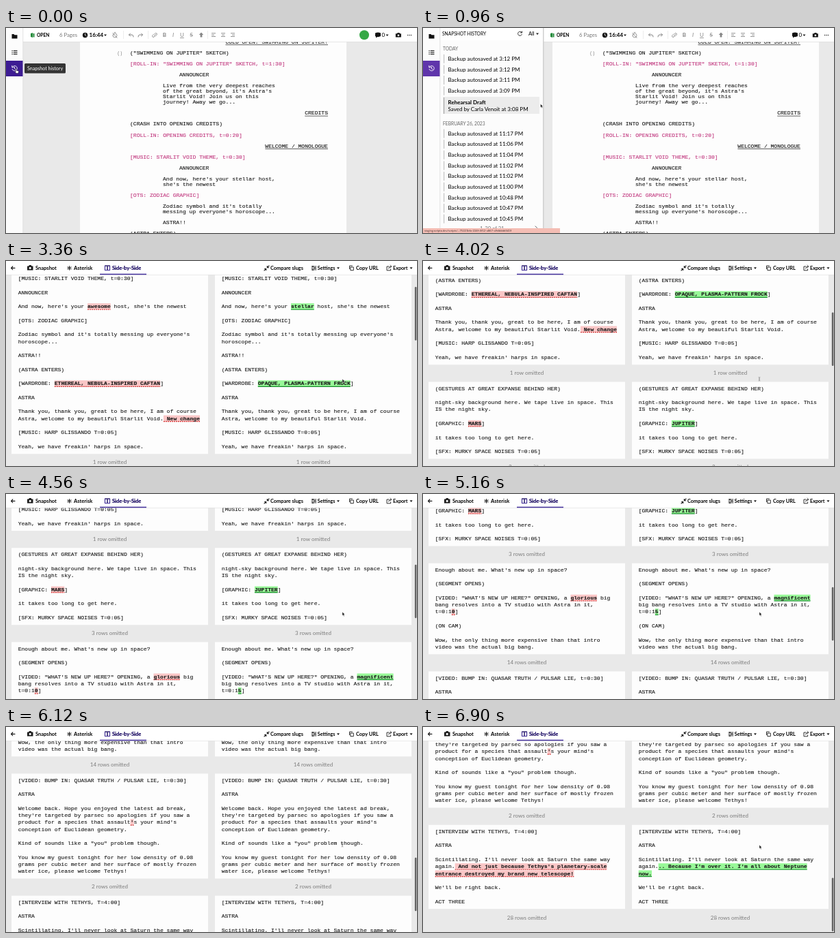
An HTML page for the animation above (6.96 s loop, 600 by 301 pixels).

```html
<!DOCTYPE html>
<html lang="en">
<head>
<meta charset="utf-8">
<title>Snapshot history and side-by-side compare</title>
<style>
html, body { margin: 0; width: 100%; height: 100%; overflow: hidden; background: #e9e9e9; }
svg { display: block; width: 100vw; height: 100vh; }
text { font-family: Lato, "Open Sans", sans-serif; white-space: pre; }
.mono { font-family: "Liberation Mono", "DejaVu Sans Mono", monospace; stroke-width: .14px; }
.line { fill: none; stroke-linecap: round; stroke-linejoin: round; }
</style>
</head>
<body>
<svg id="stage" viewBox="0 0 600 301" preserveAspectRatio="none"></svg>
<script>
const LOOP = 6960, STEP = 60;
const OPEN_COMPARE = 1500, SIDE_BY_SIDE = 2100;
const MONO = 8.04, PITCH = MONO * 0.6;
const INK = '#1c1c1c', GREY = '#8a8a8a', PURPLE = '#43309c', PINK = '#c23b80';

// Markup helpers; text is placed by the middle of its line.
const esc = s => s.replace(/&/g, '&amp;').replace(/</g, '&lt;');
const text = (x, y, s, size = 7.5, attrs = '') =>
  `<text x="${x}" y="${y + size * 0.34}" font-size="${size}" ${attrs}>${esc(s)}</text>`;
const bold = (x, y, s, size = 7.5, attrs = '') => text(x, y, s, size, `font-weight="700" ${attrs}`);
const mono = (x, y, s, color = INK, attrs = '') =>
  text(x, y - 0.7, s, MONO, `class="mono" fill="${color}" stroke="${color}" ${attrs}`);
const rect = (x, y, w, h, fill, attrs = '') =>
  `<rect x="${x}" y="${y}" width="${w}" height="${h}" fill="${fill}" ${attrs}/>`;
const circle = (x, y, r, fill) => `<circle cx="${x}" cy="${y}" r="${r}" fill="${fill}"/>`;
const fill = (d, color = INK) => `<path d="${d}" fill="${color}"/>`;
const line = (d, color = INK, w = 1) => `<path class="line" d="${d}" stroke="${color}" stroke-width="${w}"/>`;
const caret = (x, y) => fill(`M${x - 2} ${y - 1}h4l-2 2.6z`);
const group = (id, body) => `<g id="${id}">${body}</g>`;

// Script page
const script = [
  [2, 'action', '("SWIMMING ON JUPITER" SKETCH)'],
  [4, 'cue', '[ROLL-IN: "SWIMMING ON JUPITER" SKETCH, t=1:30]'],
  [6, 'speaker', 'ANNOUNCER'],
  [8, 'speech', 'Live from the very deepest reaches'],
  [9, 'speech', "of the great beyond, it's Astra's"],
  [10, 'speech', 'Starlit Void! Join us on this'],
  [11, 'speech', 'journey! Away we go...'],
  [13, 'slug', 'CREDITS'],
  [15, 'action', '(CRASH INTO OPENING CREDITS)'],
  [17, 'cue', '[ROLL-IN: OPENING CREDITS, t=0:20]'],
  [19, 'slug', 'WELCOME / MONOLOGUE'],
  [21, 'cue', '[MUSIC: STARLIT VOID THEME, t=0:30]'],
  [23, 'speaker', 'ANNOUNCER'],
  [25, 'speech', "And now, here's your stellar host,"],
  [26, 'speech', "she's the newest"],
  [28, 'cue', '[OTS: ZODIAC GRAPHIC]'],
  [30, 'speech', "Zodiac symbol and it's totally"],
  [31, 'speech', "messing up everyone's horoscope..."],
  [33, 'speech', 'ASTRA!!'],
  [35, 'action', '(ASTRA ENTERS)'],
  [0, 'slug', 'COLD OPEN: SWIMMING ON JUPITER!']
];
const indent = { action: 181, cue: 181, speaker: 253, speech: 229 };

function scriptPage() {
  let out = rect(108, 0, 389, 301, '#fdfdfd') + text(163, 37, '( )', 8, `fill="${GREY}"`);
  for (const [row, kind, s] of script) {
    const y = 21 + row * 8.03, slug = kind === 'slug';
    const x = slug ? 470 - s.length * PITCH : indent[kind];
    out += mono(x, y, s, kind === 'cue' ? PINK : INK);
    if (slug) out += rect(x, y + 3.4, 470 - x, 0.7, INK);
  }
  return out;
}

function formatBar() {
  const g = '#858585';
  const rule = x => rect(x, 4, 0.6, 12, '#e2e2e2');
  const align = (x, inset) => [0, 1, 2].map(i => {
    const cut = i === 1 ? 2 : 0;
    return rect(x - 3 + cut * inset, 7.3 + i * 2.4, 6 - cut, 0.9, g);
  }).join('');
  return fill('M36 8l3-1v7l-3-1zM39.5 8h2v5.5h-2z', '#268c3c') + bold(45, 10.5, 'OPEN', 6.6) +
    text(78, 10.5, '6 Pages', 7.7, 'fill="#777"') +
    circle(115.5, 10.5, 3.7, '#111') + line('M115.5 8.2v2.5l1.6 1', '#fff', 0.8) +
    bold(121.5, 10.5, '16:44', 8) + caret(145, 10.5) +
    line('M156 11a3 3 0 1 0 6 0a3 3 0 1 0-6 0M158 6.5h2M156 7.5l6 7', g, 0.8) +
    rule(171) +
    line('M179.5 10h4.5q2 0 2 3M181.5 8l-2 2l2 2', g) +
    line('M199.5 10h-4.5q-2 0-2 3M197.5 8l2 2l-2 2', g) + rule(207) +
    line('M216 12l3-3M216 9.5l1.6-1.6a1.7 1.7 0 0 1 2.4 2.4l-1.2 1.2M218 11.5l-1.6 1.6a1.7 1.7 0 0 1-2.4-2.4l1.2-1.2', g, 0.8) +
    bold(228.7, 10.5, 'B', 8, `fill="${g}"`) + text(243, 10.5, 'I', 8, `fill="${g}" font-style="italic"`) +
    text(254, 10.3, 'U', 8, `fill="${g}" text-decoration="underline"`) +
    text(268.5, 10.5, 'S', 8, `fill="${g}" text-decoration="line-through"`) +
    fill('M285 6.5l3.2 3.5h-1.8v3.5h-2.8v-3.5h-1.8z', g) + rule(294) +
    align(303, 0) + align(317, 0.5) + align(331, 1);
}

const fixedTools = () =>
  fill('M539 7.5q4-2 8 0v4.5q-3 1.5-5 1l-2 1.5v-2.2h-1z', '#111') + text(548.5, 10.5, '0', 8) + caret(556.5, 10.5) +
  fill('M568.8 8.3h2l1-1.3h2.4l1 1.3h1.6v5.2h-8z', '#111') + circle(572.9, 10.8, 1.4, '#fff') +
  [586.5, 589, 591.5].map(x => circle(x, 10.5, 0.8, '#333')).join('');

const sidebar = () => rect(0, 0, 25, 301, '#fcfcfc') + rect(24.5, 0, 0.7, 301, '#d5d5d5') +
  fill('M8.5 9h3l1 1.2h4v5.3h-8z', '#111') +
  [32.8, 35.3, 37.8].map(y => rect(8.5, y, 1.2, 1.2, '#111') + rect(10.8, y, 5.7, 1.1, '#111')).join('') +
  rect(0, 48, 24.5, 23, '#5f35ab', 'id="historyTab"') +
  line('M9.3 57.5a3.7 3.7 0 1 1-.2 3M8.8 55.3v2.5h2.5M12.5 57.5v2.2l1.7 1', '#fff', 0.9);

// Snapshot list
const ROW = 15.65;
const today = ['3:12', '3:12', '3:11', '3:09'];
const earlier = ['11:17', '11:06', '11:04', '11:02', '11:02', '11:00', '10:48', '10:47', '10:45'];
const backup = (time, y) => rect(30, y - 6.5, 1.2, 13, '#c4c4c4') + text(36.5, y, `Backup autosaved at ${time} PM`, 8);

const historyPanel = () => rect(25, 0, 151, 301, '#fcfcfc') + rect(25, 0, 151, 18, '#fff') +
  text(28, 8.5, 'SNAPSHOT HISTORY', 6.65) +
  line('M144 6.5a3 3 0 1 0 .3 3M144.5 5v2h-2', INK, 0.9) + text(154, 8.5, 'All', 7.5) + caret(167, 8.5) +
  rect(29, 0, 141, 15, '#ececec', 'id="hover"') +
  text(29, 30.5, 'TODAY', 6.7, 'fill="#666"') + today.map((t, i) => backup(t, 45.2 + i * ROW)).join('') +
  rect(30, 102, 1.2, 24, '#aaa') + bold(36.5, 109, 'Rehearsal Draft', 8) +
  text(36.5, 119.5, 'Saved by Carla Venoit at 3:08 PM', 8) +
  text(29, 140.3, 'FEBRUARY 26, 2023', 6.7, 'fill="#666"') +
  earlier.map((t, i) => backup(t, 155 + i * ROW)).join('') +
  text(83, 294, '1-20 of 21', 7.6, 'fill="#777"') + line('M164 291l2.5 2.5l-2.5 2.5', '#666') +
  rect(175, 0, 1.5, 301, '#cfcfcf');

// Compare cards: {removed|added} marks a difference, {~a|~b} differs without a highlight,
// empty strings are blank rows.
const cards = [
  ['10 rows', ['[MUSIC: STARLIT VOID THEME, t=0:30]', '', 'ANNOUNCER', '',
    "And now, here's your {awesome|stellar} host, she's the newest", '', '[OTS: ZODIAC GRAPHIC]', '',
    "Zodiac symbol and it's totally messing up everyone's", 'horoscope...', '', 'ASTRA!!', '', '(ASTRA ENTERS)', '',
    '[WARDROBE: {ETHEREAL, NEBULA-INSPIRED CAFTAN|OPAQUE, PLASMA-PATTERN FROCK}]', '', 'ASTRA', '',
    'Thank you, thank you, great to be here, I am of course',
    'Astra, welcome to my beautiful Starlit Void.{ New change|}', '',
    '[MUSIC: HARP GLISSANDO T=0:05]', '', "Yeah, we have freakin' harps in space."]],
  ['1 row', ['(GESTURES AT GREAT EXPANSE BEHIND HER)', '',
    'night-sky background here. We tape live in space. This', 'IS the night sky.', '',
    '[GRAPHIC: {MARS|JUPITER}]', '', 'it takes too long to get here.', '', '[SFX: MURKY SPACE NOISES T=0:05]']],
  ['3 rows', ["Enough about me. What's new up in space?", '', '(SEGMENT OPENS)', '',
    '[VIDEO: "WHAT\'S NEW UP HERE?" OPENING, a {glorious|magnificent} {~big|}',
    '{~bang|~big bang} resolves into a TV studio with Astra in it,', 't=0:1{0|5}]', '', '(ON CAM)', '',
    'Wow, the only thing more expensive than that intro', 'video was the actual big bang.']],
  ['14 rows', ['[VIDEO: BUMP IN: QUASAR TRUTH / PULSAR LIE, t=0:30]', '', 'ASTRA', '',
    'Welcome back. Hope you enjoyed the latest ad break,', "they're targeted by parsec so apologies if you saw a",
    "product for a species that assault{'|}s your mind's", 'conception of Euclidean geometry.', '',
    'Kind of sounds like a "you" problem though.', '',
    'You know my guest tonight for her low density of 0.98', 'grams per cubic meter and her surface of mostly frozen',
    'water ice, please welcome Tethys!']],
  ['2 rows', ['[INTERVIEW WITH TETHYS, T=4:00]', '', 'ASTRA', '',
    "Scintillating. I'll never look at Saturn the same way",
    "again.{ And not just because Tethys's planetary-scale|.. Because I'm over it. I'm all about Neptune}",
    '{entrance destroyed my brand new telescope!|now.}', '', "We'll be right back.", '', 'ACT THREE']]
];
const SIDES = [{ x: 8, bg: '#fac6c6', mark: '#d02c2c', dash: '2 1' }, { x: 305, bg: '#98f898', mark: '#128a26', dash: '' }];

function diffLine(x, y, s, side) {
  const { bg, mark, dash } = SIDES[side];
  let out = '', column = 0;
  for (const part of s.split(/(\{.*?\})/)) {
    const choice = part[0] === '{' ? part.slice(1, -1).split('|')[side] : '~' + part;
    const marked = choice[0] !== '~', words = marked ? choice : choice.slice(1);
    if (!words) continue;
    const left = x + column * PITCH, w = words.length * PITCH;
    if (marked) out += rect(left, y - 5.1, w, 9, bg) +
      `<path d="M${left} ${y + 4}h${w}" stroke="${mark}" stroke-width="1.2" stroke-dasharray="${dash}"/>`;
    out += mono(left, y, words, INK, marked ? 'font-weight="700"' : '');
    column += words.length;
  }
  return out;
}

function comparePage() {
  const omitted = (label, y) => SIDES.map(({ x }) =>
    text(x + 143.5, y, label + ' omitted', 8, 'fill="#7c7c7c" text-anchor="middle"')).join('');
  let out = SIDES.map(({ x }) => rect(x, 28, 287, 20, '#fafafa')).join('') +
    bold(12, 38, 'REHEARSAL DRAFT - FEB 27, 2023 - 3:08 PM', 7.5) + bold(309, 38, 'CURRENT DOCUMENT', 7.5) +
    text(391, 38, 'as of 3:15 pm', 7.4, 'fill="#777"');
  let top = 73;
  for (const [label, rows] of cards) {
    const height = (rows.length - 1) * 10.28 + 20.5;
    out += omitted(label, top - 13);
    SIDES.forEach(({ x }, side) => {
      out += rect(x, top, 287, height, '#fdfdfd');
      rows.forEach((s, i) => { if (s) out += diffLine(x + 9.7, top + 10.1 + i * 10.28, s, side); });
    });
    top += height + 25.2;
  }
  return out + omitted('28 rows', top - 12.2);
}

const tabs = [
  { id: 'snapshotTab', x: 43, label: 'Snapshot', from: 26, to: 79,
    icon: c => fill('M31 7.5h2l1-1.5h2.5l1 1.5h2v6h-8.5z', c) + circle(35.2, 10.3, 1.6, '#fff') },
  { id: 'asteriskTab', x: 99, label: 'Asterisk', icon: c => line('M92.5 7.5v5.6M90 8.9l5 2.8M95 8.9l-5 2.8', c, 1.1) },
  { id: 'sideTab', x: 155, label: 'Side-by-Side', from: 137, to: 205,
    icon: c => line('M144.5 7h7v6.5h-7zM148 7v6.5', c, 1.1) }
];
const compareBar = () => rect(0, 0, 600, 20, '#fff') + rect(0, 20, 600, 0.6, '#e0e0e0') +
  line('M7.5 10.3h5.5M9.8 8l-2.3 2.3l2.3 2.3', INK, 1.2) +
  tabs.map(t => t.icon(INK) + bold(t.x, 10, t.label)).join('') +
  tabs.filter(t => t.from).map(t => group(t.id, t.icon(PURPLE) +
    bold(t.x, 10, t.label, 7.5, `fill="${PURPLE}"`) + rect(t.from, 18.7, t.to - t.from, 1.5, PURPLE))).join('') +
  line('M377 14l2.7-2.7h-2.2M379.7 11.3v2.2M384 7l-2.7 2.7h2.2M381.3 9.7v-2.2', INK, 1.1) + bold(386, 10.3, 'Compare slugs', 7.4) +
  line('M446 8h7M446 10.4h7M446 12.8h7', INK, 0.9) + circle(448, 8, 1.1, INK) + circle(451, 10.4, 1.1, INK) + circle(448, 12.8, 1.1, INK) +
  bold(454.8, 10.3, 'Settings', 7.2) + caret(485, 10.3) +
  line('M501.5 11.5v-4.5h4M503.3 9h4v4.7h-4z', INK, 0.9) + bold(511, 10.3, 'Copy URL', 7.4) +
  line('M559 8h-3v5.8h5.6v-2M558.5 11q.5-3 4-3M561 6.3l1.8 1.7l-1.8 1.7', INK, 0.9) + bold(565, 10.3, 'Export', 7.2) + caret(591.5, 10.3);

const stage = document.getElementById('stage');
stage.innerHTML = rect(0, 0, 600, 301, '#e9e9e9') + group('page', scriptPage()) +
  group('editor', rect(25, 0, 575, 20, '#fff') + rect(25, 20, 575, 0.7, '#dedede') +
    group('tools', formatBar()) + group('avatar', circle(523, 10.3, 7, '#35a845')) + fixedTools() +
    group('panel', historyPanel()) + sidebar() +
    group('tooltip', rect(27, 52, 60, 14.5, '#343434', 'rx="1.5"') + text(31, 59.2, 'Snapshot history', 7.1, 'fill="#fff"')) +
    group('status', rect(0, 294, 200, 7, '#f4bdb4', 'id="statusBox"') +
      text(2, 297.4, 'staging.scripto.dev/scripts/...75221bfa-224f-4f12-a867-a9ebbbbf443f', 4.1, 'fill="#4d3a38"'))) +
  group('compare', group('content', comparePage()) + compareBar() +
    rect(596.8, 22, 2.6, 78.5, '#636363', 'id="thumb" rx="1.2"')) +
  group('arrow', `<path d="M0 0v5.2l1.2-1l.9 1.9l.9-.5l-.9-1.8h1.6z" fill="#111" stroke="#fff" stroke-width=".4"/>`) +
  group('beam', line('M-1-2.8q1 0 1 .9v3.8q0 .9 1 .9M1-2.8q-1 0-1 .9v3.8q0 .9-1 .9', '#555', 0.4)) +
  group('hand', `<path d="M0 0q.9-.6 1.2.4l.3 2l2.3.6q.9.4.6 1.4l-.7 2.2h-2.7l-2-2.6q.2-.8 1.3.1z" fill="#fff" stroke="#111" stroke-width=".5"/>`);

const ui = {};
stage.querySelectorAll('[id]').forEach(e => { ui[e.id] = e; });
const show = (id, on) => ui[id].setAttribute('display', on ? 'inline' : 'none');
const move = (id, x, y = 0) => ui[id].setAttribute('transform', `translate(${x} ${y})`);
const set = (id, name, value) => ui[id].setAttribute(name, value);
const progress = (t, a, b) => Math.min(1, Math.max(0, (t - a) / (b - a)));
const smooth = k => k * k * (3 - 2 * k);

const cursorKeys = [[180, 14, 60], [720, 128, 58], [960, 171.5, 111.5], [1440, 160, 114],
  [1560, 160, 114], [2040, 177, 11], [2160, 177, 11], [2700, 491, 173.3]];
function cursorAt(t) {
  const i = cursorKeys.findIndex(k => k[0] >= t);
  if (i < 1) return cursorKeys.at(i).slice(1);
  const [a, b] = [cursorKeys[i - 1], cursorKeys[i]], k = smooth(progress(t, a[0], b[0]));
  return [a[1] + (b[1] - a[1]) * k, a[2] + (b[2] - a[2]) * k];
}

// Hermite curve through the scroll stops, at rest at both ends.
const stops = [[2820, 0], [4020, 188], [5160, 402], [6120, 594], [6900, 698]];
const slope = i => i < 1 || i > stops.length - 2 ? 0 :
  (stops[i + 1][1] - stops[i - 1][1]) / (stops[i + 1][0] - stops[i - 1][0]);
function scrollAt(t) {
  if (t <= stops[0][0]) return 0;
  const i = stops.findIndex(s => s[0] >= t);
  if (i < 0) return stops.at(-1)[1];
  const [[t0, y0], [t1, y1]] = [stops[i - 1], stops[i]], d = t1 - t0, k = (t - t0) / d;
  return y0 + (y1 - y0) * smooth(k) + d * k * (1 - k) * ((1 - k) * slope(i - 1) - k * slope(i));
}

function rowUnder(x, y) {
  if (x < 29 || x > 173) return null;
  if (y >= 101 && y <= 126) return [101, 25];
  const i = Math.round((y - 45.2) / ROW);
  return i >= 0 && i < today.length ? [45.2 + i * ROW - 7.5, 15] : null;
}

function draw(t) {
  const comparing = t >= OPEN_COMPARE, sideBySide = t >= SIDE_BY_SIDE;
  const [x, y] = cursorAt(t);
  const open = comparing ? 0 : 1 - (1 - progress(t, 120, 480)) ** 3;

  show('editor', !comparing);
  show('compare', comparing);
  show('page', !sideBySide);
  move('page', 81 * open);
  move('tools', 150 * open);
  move('panel', 151 * (open - 1));
  show('panel', open > 0);
  show('avatar', open < 0.1);
  show('tooltip', t < 240);
  set('historyTab', 'fill', t < 300 ? '#3d1c93' : '#5f35ab');

  const row = open === 1 ? rowUnder(x, y) : null;
  show('hover', row);
  show('status', row);
  if (row) { set('hover', 'y', row[0]); set('hover', 'height', row[1]); }
  set('statusBox', 'width', 200 + 236 * smooth(progress(t, 1140, 1380)));

  const scroll = scrollAt(t);
  show('content', sideBySide);
  move('content', 0, -scroll);
  show('snapshotTab', !sideBySide);
  show('sideTab', sideBySide);
  show('thumb', scroll > 0);
  set('thumb', 'y', 21.8 + scroll * 0.286);

  const reading = (t >= 3780 && t < 4140) || (t >= 5940 && t < 6240);
  const pointing = t < 300 || (t >= 1980 && t < 2220);
  show('beam', reading);
  show('hand', pointing);
  show('arrow', !reading && !pointing);
  ['arrow', 'hand', 'beam'].forEach(id => move(id, x, y));
}

const start = performance.now();
function tick() {
  const t = (performance.now() - start) % LOOP;
  draw(Math.floor(t / STEP) * STEP);
  requestAnimationFrame(tick);
}
draw(0);
tick();
</script>
</body>
</html>
```
